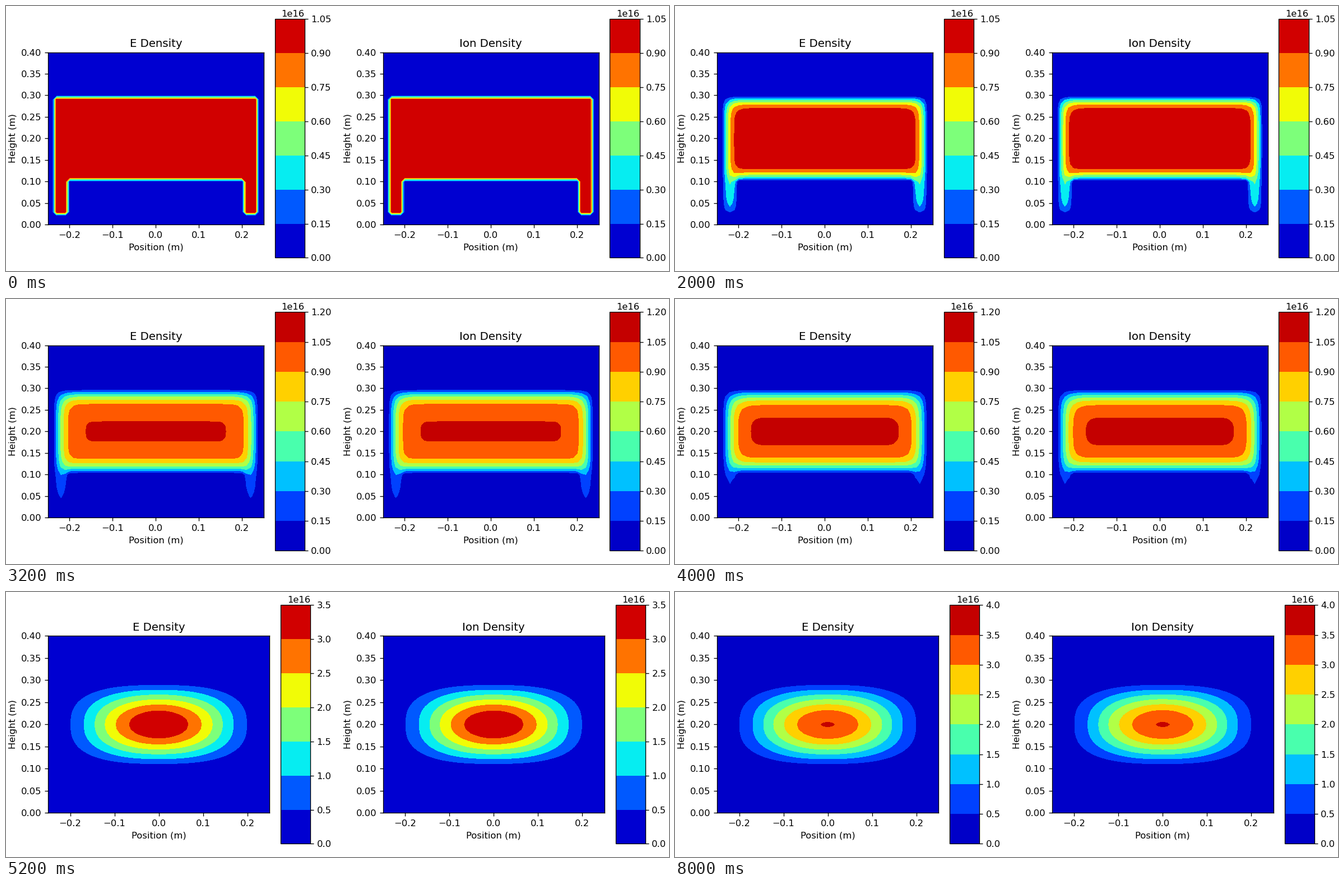
Animation of 1183x473 px, one loop 9 s. Source, as a matplotlib script:

```python
import numpy as np
import matplotlib.pyplot as plt
from matplotlib.animation import FuncAnimation

W, H, DPI = 1183, 473, 118.3
INTERVAL, FRAMES = 200, 45
STATES = 21            # a new state every 400 ms, the last one held
EARLY = 11             # states taken from the diffusion run
PEAK = 3.53            # steady-state maximum, in units of 1e16
MIDDLE = 236.45        # vertical centre of every axes, in pixels

plt.rcParams["font.family"] = "DejaVu Sans"
x = np.linspace(-0.25, 0.25, 51)
y = np.linspace(0, 0.4, 41)
gx, gy = np.meshgrid(x, y)


def diffusion_states(mixing=0.382, growth=0.0065, substeps=20):
    """Uniform plasma diffusing to the walls while slowly growing."""
    chamber = (abs(gx) < 0.235) & (gy > 0.025) & (gy < 0.295)
    pedestal = (abs(gx) < 0.205) & (gy < 0.105)
    inside = chamber & ~pedestal
    n = inside.astype(float)
    states = [n.copy()]
    for _ in range(EARLY - 1):
        for _ in range(substeps):
            lap = -4 * n
            for axis in (0, 1):
                lap += np.roll(n, 1, axis) + np.roll(n, -1, axis)
            n = (n + mixing / substeps * lap) * inside
            n *= np.exp(growth / substeps)
        states.append(n.copy())
    return states


def steady_profile(steps=2000):
    """Nested superellipses; s runs from 0 at the peak to 1 at the wall."""
    s = (np.arange(steps) + 0.5)[:, None, None] / steps
    half_w = s * (0.1736 + 0.027 * s**2 + 0.0415 * s**11)
    half_h = s * (0.0815 + 0.0185 * s**3.5)
    power = 2 + s**4
    outside = (abs(gx) / half_w)**power + (abs(gy - 0.2) / half_h)**power > 1
    depth = outside.mean(axis=0)
    return np.clip(PEAK * (1 - depth**2), 0, None)


early = diffusion_states()
steady = steady_profile()


def density(state):
    if state < EARLY:
        return early[state]
    gap = 0.63 * 0.25**(state - EARLY)
    return steady * (PEAK - gap) / PEAK


fig = plt.figure(figsize=((W + 1e-6) / DPI, (H + 1e-6) / DPI), dpi=DPI)
shown = None


def pixel_axes(left, width, height):
    bottom = MIDDLE + height / 2
    return fig.add_axes([left / W, 1 - bottom / H, width / W, height / H])


def draw_panel(left, title, n, width):
    ax = pixel_axes(left, width, 0.8 * width)
    filled = ax.contourf(x, y, n, cmap="jet")
    ax.set_xticks(np.arange(-2, 3) / 10)
    ax.set_yticks(np.arange(9) * 0.05)
    ax.set_xlim(-0.25, 0.25)
    ax.set_ylim(0, 0.4)
    ax.set_title(title)
    ax.set_xlabel("Position (m)")
    ax.set_ylabel("Height (m)")
    cax = pixel_axes(left + width + 19.8, 53.25, 426)
    fig.colorbar(filled, cax=cax)
    cax.annotate("1e16", (1, 1), (0, 3), xycoords="axes fraction",
                 textcoords="offset points", ha="right", va="baseline")


def update(frame):
    global shown
    state = min(frame // 2, STATES - 1)
    if state != shown:
        fig.clear()
        n = density(state)
        # one-decimal colorbar labels leave more room for the plots
        width = 384.8 if state < EARLY else 395
        draw_panel(75, "E Density", n, width)
        draw_panel(672.75, "Ion Density", n, width)
        shown = state
    return []


anim = FuncAnimation(fig, update, frames=FRAMES, interval=INTERVAL,
                     repeat=True, repeat_delay=0, blit=False)
plt.show()
```
